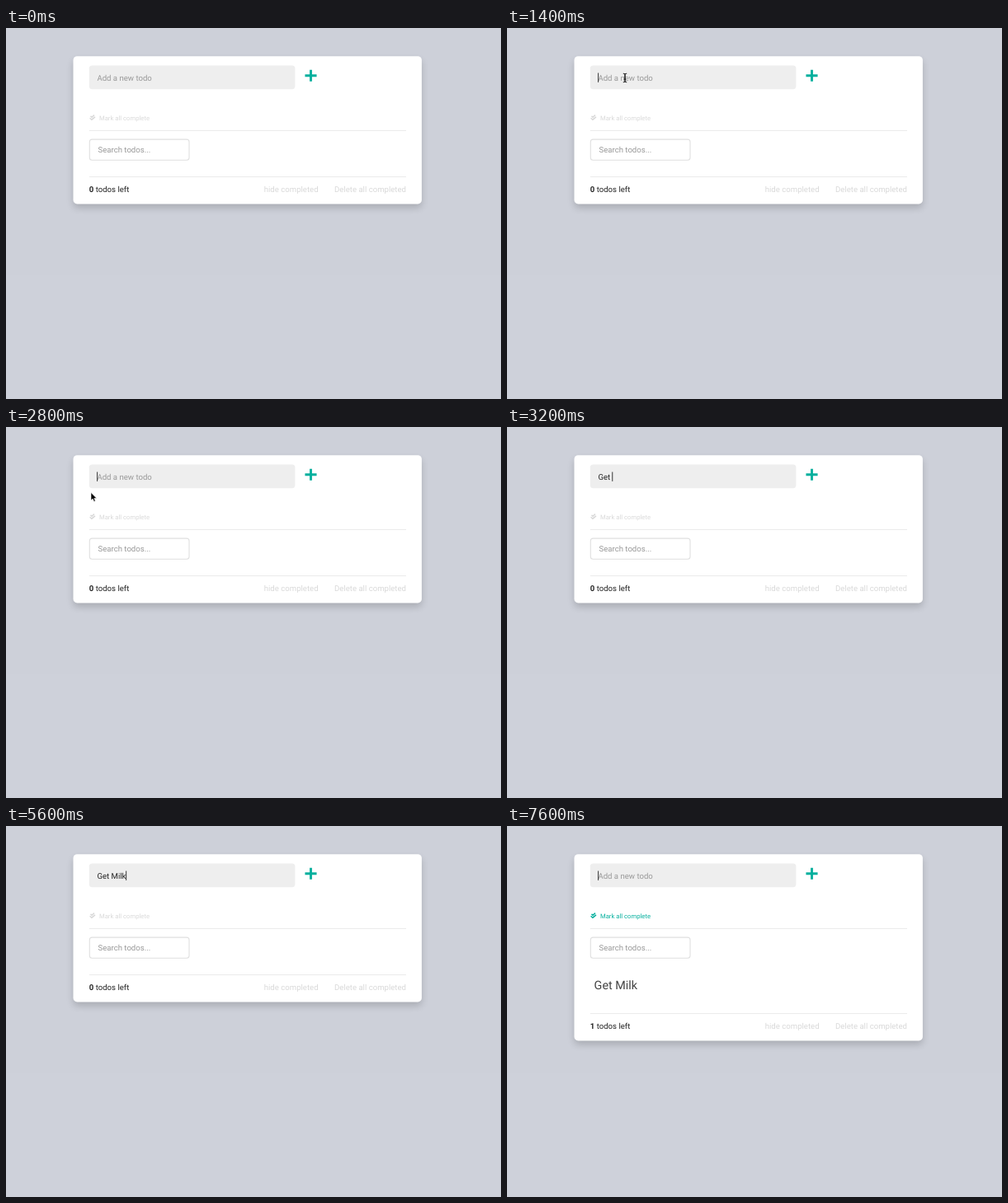
Write an HTML page that moves like this. It is 600 by 450 pixels and loops after 8 s.

```html
<!DOCTYPE html>
<html lang="en">
<head>
<meta charset="utf-8">
<title>Todo list</title>
<style>
  html, body { margin: 0; width: 100%; height: 100%; overflow: hidden; background: #cdd0d9; }
  svg { display: block; width: 100vw; height: 100vh; }
  text { font: 9.6px Roboto, sans-serif; white-space: pre; text-rendering: geometricPrecision; }
  .hint { fill: #999; }
  .muted { fill: #d9d9d9; }
  .rule { stroke: #ebebeb; stroke-width: 1; }
</style>
</head>
<body>
<svg viewBox="0 0 600 450">
  <defs>
    <filter id="blur" x="-10%" y="-20%" width="120%" height="140%">
      <feGaussianBlur stdDeviation="4.5"/>
    </filter>
  </defs>
  <rect width="600" height="450" fill="#cdd0d9"/>
  <rect y="300" width="600" height="150" fill="#ced1da"/>

  <rect id="shadow" x="81.5" y="39" width="422.4" height="179.3" rx="5" fill="#000" opacity=".17" filter="url(#blur)"/>
  <rect id="card" x="81.5" y="34.2" width="422.4" height="179.3" rx="4.8" fill="#fff"/>

  <rect x="100.8" y="45.6" width="249.6" height="28.6" rx="3.6" fill="#eee"/>
  <text id="entry" x="110.4" y="63.7"></text>
  <rect id="caret" y="54.5" width=".9" height="11.4" fill="#222"/>
  <path d="M369.5 52.2V63.3M363.9 57.7H375.1" stroke="#06b09e" stroke-width="2.9" stroke-linecap="square" stroke-linejoin="round"/>

  <g id="markAll">
    <path d="M102.5 106.9L104 108.3L107 105.6M101.6 109.2L103.9 111.2L108 107.8" fill="none" stroke="currentColor" stroke-width="1.5"/>
    <text x="113" y="111.6" fill="currentColor" style="font-size:7.68px">Mark all complete</text>
  </g>
  <path class="rule" d="M100.8 124.5H485"/>

  <rect x="101.3" y="135.1" width="120.7" height="25.2" rx="3" fill="#fff" stroke="#e0e0e0" stroke-width="1.1"/>
  <text class="hint" x="111.5" y="151.3">Search todos...</text>

  <text id="item" x="105.6" y="198.1" fill="#444" style="font-size:14.4px">Get Milk</text>

  <g id="footer">
    <path class="rule" d="M100.8 180.5H485"/>
    <text x="100.8" y="199.3" fill="#222"><tspan id="count" font-weight="700">0</tspan> todos left</text>
    <text class="muted" x="378.6" y="199.3" text-anchor="end">hide completed</text>
    <text class="muted" x="485" y="199.3" text-anchor="end">Delete all completed</text>
  </g>

  <path id="arrow" d="M0 0V9.6L2.2 7.6L3.7 11L5.3 10.3L3.9 7H6.9Z" fill="#000" stroke="#fff" stroke-width=".6"/>
  <g id="beam" fill="none">
    <path id="beamShape" d="M-2.2 -5.2H-1Q0 -5.2 0 -4.2V4.2Q0 5.2 -1 5.2H-2.2M2.2 -5.2H1Q0 -5.2 0 -4.2V4.2Q0 5.2 1 5.2H2.2M-1.2 1.6H1.2" stroke="#fff" stroke-width="2" opacity=".7"/>
    <use href="#beamShape" style="display:none"/>
    <path d="M-2.2 -5.2H-1Q0 -5.2 0 -4.2V4.2Q0 5.2 -1 5.2H-2.2M2.2 -5.2H1Q0 -5.2 0 -4.2V4.2Q0 5.2 1 5.2H2.2M-1.2 1.6H1.2" stroke="#111" stroke-width="1"/>
  </g>
</svg>
<script>
const LOOP = 8000, ADDED = 6000, GROW = 47;
const $ = id => document.getElementById(id);
const show = (id, on) => $(id).setAttribute('visibility', on ? 'visible' : 'hidden');
const move = (id, x, y) => $(id).setAttribute('transform', `translate(${x} ${y})`);

// Each track lists [start in ms, value...]; a value holds until the next start.
const typed = [
  [0, ''], [3000, 'Ge'], [3200, 'Get '], [3800, 'Get M'], [4200, 'Get Mi'],
  [4400, 'Get Mill'], [4800, 'Get Millk'], [5200, 'Get Mill'],
  [5400, 'Get Mil'], [5600, 'Get Milk'], [ADDED, '']
];
const caretOn = [
  [0, false], [1400, true], [2000, false], [2400, true], [3600, false],
  [3800, true], [ADDED, false], [6600, true], [7000, false], [7600, true]
];
const pointer = [
  [0, ''], [600, 'arrow', 137, 114], [800, 'arrow', 138, 98], [1000, 'arrow', 140, 79],
  [1200, 'beam', 142, 62], [1400, 'beam', 143, 60.5], [1600, 'beam', 145, 60.5],
  [1800, 'beam', 145.5, 60.5], [2200, 'beam', 146, 60.5], [2800, 'arrow', 103, 79.5], [3000, '']
];

const at = (track, t) => track.findLast(step => step[0] <= t).slice(1);

function draw(t) {
  const [text] = at(typed, t);
  const [caret] = at(caretOn, t);
  const [kind, x, y] = at(pointer, t);
  const added = t >= ADDED;
  const extra = added ? GROW : 0;

  const entry = $('entry');
  entry.textContent = text || 'Add a new todo';
  entry.setAttribute('fill', text ? '#222' : '#999');
  $('caret').setAttribute('x', 110.2 + (text ? entry.getComputedTextLength() : 0));
  show('caret', caret);

  for (const id of ['arrow', 'beam']) {
    show(id, kind === id);
    if (kind === id) move(id, x, y);
  }

  for (const id of ['card', 'shadow']) $(id).setAttribute('height', 179.3 + extra);
  move('footer', 0, extra);
  show('item', added);
  $('count').textContent = added ? 1 : 0;
  $('markAll').setAttribute('color', added ? '#06b09e' : '#d9d9d9');
}

const start = performance.now();
function tick() {
  draw((performance.now() - start) % LOOP);
  requestAnimationFrame(tick);
}
tick();
</script>
</body>
</html>
```
